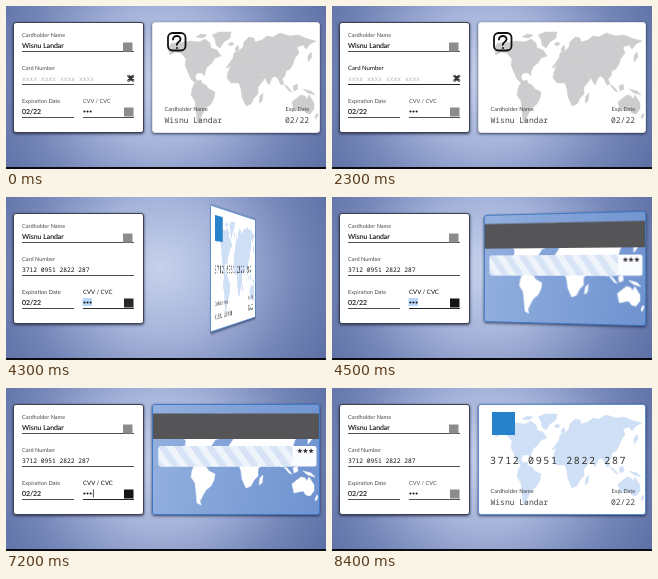
An HTML page that plays this animation: 320x163 px, repeating every 8500 ms.

```html
<!DOCTYPE html>
<html lang="en">
<head>
<meta charset="utf-8">
<title>Card form</title>
<style>
html, body { margin: 0; width: 100%; height: 100%; overflow: hidden; }
body {
  position: relative;
  background: radial-gradient(circle at 155px 71px, #c6d2ec 0, #a5b3da 70px, #7586b8 135px, #576a9f 200px);
}
body::after { content: ""; position: absolute; left: 0; top: 161px; width: 100%; height: 2px; background: #0b0c12; }
svg { position: absolute; left: 0; top: 0; display: block; }
text { font-family: Lato, sans-serif; text-rendering: geometricPrecision; white-space: pre; }
.mono { font-family: "Noto Sans Mono", monospace; }
.label { font-size: 5.6px; }
.value { font-size: 6.9px; fill: #111; stroke: #111; stroke-width: .12px; }
.box { position: absolute; box-sizing: border-box; top: 16px; height: 111px; border-radius: 3px; box-shadow: 0 1px 3px rgba(15, 20, 45, .75); }
.form { left: 7px; width: 131px; background: #fff; border: .6px solid #3c4152; }
.scene { position: absolute; left: 146px; top: 16px; width: 168px; height: 111px; perspective: 600px; }
#card { width: 100%; height: 100%; transform-style: preserve-3d; }
.face { top: 0; left: 0; width: 168px; overflow: hidden; backface-visibility: hidden; }
.face svg { left: -1px; top: -1px; }
#front { background: #fff; border: 1px solid; }
#back { background: linear-gradient(100deg, #93b0df, #6f93d0); border: 1px solid #3f78c4; transform: rotateY(180deg); }
</style>
</head>
<body>
<div class="box form"></div>
<svg id="fields" width="320" height="163"></svg>

<div class="scene"><div id="card">
  <div id="front" class="box face">
    <svg width="168" height="111" viewBox="146 16 168 111">
      <defs>
        <path id="map" stroke-width=".5" stroke-linejoin="round" d="
          M162 42l4-5 8 0 10-2 9 1 6-3 5 4 1 5 6 2 4 6-6 2-3 5-5 4-2 5 0 4-3-3-5 0-2 4 2 4 4-1 1 4 3 2-2 1-7-3-5-5-4-9-2-5 1-6-5-6-6-1-5 3z
          M206 29l7-3 12 0-1 6-6 4-4 6-4-3-1-6z
          M190 31l5-3 6 1-4 3z
          M188 78l5-2 7 3 3 4 6 3-1 6-3 6-5 4-3 5-3 6 1 4-4-2-1-11-1-9-4-6 1-6z
          M226 57l3-3 9-1 3 2 6 0 4 8 4 6 5 0-3 6-5 6 0 7-4 4-3 6-5 2-4-9-1-8-2-6-8 0-4-5 1-6z
          M254 90l3-3-1 8-3 2z
          M227 52l1-5 5-2 4-4 1-5 5-5 5 1 1 4 7-2 5-4 6 1 7-4 10 3 8-1 10 4 8 2-6 3-4 5-3-4-6 2 2 6-4 5-2 6-3 5-4 2-1 5-3 3 2 5-3 1-3-6-3-3-3 2-3 7-3-5-2-5-6-2 2 3-4 5-5 1-4-7-1-4-6-1-2-3-3 2-3-4-3 2-3 1z
          M229 43l3-4 1 5-3 2z
          M222 38l4-2 2 2-3 2z
          M302 50l3-4 1 5-4 5z
          M278 79l3 1 5 6-3-1z
          M287 80l4-2 1 5-4 2z
          M297 83l8 2 4 4-7-2z
          M286 96l5-4 4-3 4 1 2 3 2-4 5 8 0 6-4 5-4-1-3-4-9 2z
          M309 111l2-4 1 2-2 4z"/>
      </defs>
      <use id="frontMap" href="#map"/>
      <g id="unknown" fill="none" stroke="#111" stroke-linecap="round">
        <rect x="162" y="27" width="17.500" height="17.500" rx="4.500" stroke-width="1.800"/>
        <path d="M167 33.500c0-5 8-4.500 7.500 0-.2 2.600-3.700 2.500-3.700 5.200" stroke-width="1.900"/>
        <circle cx="170.800" cy="42" r=".5"/>
      </g>
      <rect id="brand" x="160" y="24" width="23" height="23" fill="#2682cb"/>
      <text id="cardNumber" class="mono" x="158" y="75.500" font-size="10" letter-spacing="1.620" fill="#333">3712 0951 2822 287</text>
      <g fill="#444">
        <text class="label" x="158.500" y="104.500">Cardholder Name</text>
        <text class="label" x="279.500" y="104.500">Exp. Date</text>
        <text class="mono" x="158.500" y="116.500" font-size="8">Wisnu Landar</text>
        <text class="mono" x="279" y="116.500" font-size="8">02/22</text>
      </g>
    </svg>
  </div>
  <div id="back" class="box face">
    <svg width="168" height="111" viewBox="146 16 168 111">
      <defs>
        <pattern id="stripes" width="13" height="13" patternUnits="userSpaceOnUse" patternTransform="rotate(-35)">
          <rect width="13" height="13" fill="#eff4fb"/><rect width="6.500" height="13" fill="#d6e4f6"/>
        </pattern>
      </defs>
      <use href="#map" fill="#fff" stroke="#fff"/>
      <rect x="146" y="25.500" width="168" height="25.500" fill="#555557"/>
      <rect x="152.500" y="58" width="158" height="20.500" rx="2.500" fill="#fafcff"/>
      <rect x="152.500" y="58" width="134" height="20.500" rx="2.500" fill="url(#stripes)"/>
      <text id="cardCvc" class="mono" x="308" y="68" font-size="9.500" font-weight="bold" text-anchor="end" fill="#111">***</text>
    </svg>
  </div>
</div></div>

<script>
const LOOP = 8500, NUMBER = 670, PASTE = 2380, EXP = 3770, CVC = 4135, BLUR = 7850;
const KEYS = [5480, 5780, 5980];
const $ = id => document.getElementById(id);
const clamp = v => Math.max(0, Math.min(1, v));
const ramp = (t, start, length) => clamp((t - start) / length);
const mix = (a, b, k) => `rgb(${a.map((v, i) => Math.round(v + (b[i] - v) * k))})`;

// name, label, x, baseline, right end, focus start, focus end
const fields = [
  ["name", "Cardholder Name", 16, 31, 128, -1, -1],
  ["number", "Card Number", 16, 64, 128, NUMBER, EXP],
  ["exp", "Expiration Date", 16, 97, 68, EXP, CVC],
  ["cvc", "CVV / CVC", 77, 97, 128, CVC, BLUR]
];
$("fields").innerHTML = `
  <rect id="expSel" x="15.500" y="101" width="19.500" height="8" fill="#b3d4f8"/>
  <rect id="cvcSel" x="76.500" y="101" width="9.500" height="8" fill="#b9d8fa"/>` +
  fields.map(([id, label, x, y, end]) => `
    <text id="${id}Label" class="label" x="${x}" y="${y}">${label}</text>
    <path id="${id}Line" d="M${x} ${y + 14.5}H${end}" stroke-width=".9"/>`).join("") + `
  <text class="value" x="16" y="42">Wisnu Landar</text>
  <text id="mask" class="mono" x="16" y="74.500" font-size="6.330" fill="#b5b5b5">xxxx xxxx xxxx xxxx</text>
  <text id="number" class="mono" x="16" y="74.800" font-size="6.250" fill="#111">3712 0951 2822 287</text>
  <text class="value" x="16" y="108">02/22</text>
  <g id="dots">${[0, 1, 2].map(i => `<circle cx="${78.4 + i * 3.1}" cy="105.500" r="1.050" fill="#151515"/>`).join("")}</g>
  <rect x="117" y="36.500" width="9.500" height="9" fill="#8c8c8e"/>
  <rect id="cvcIcon" x="118" y="101.500" width="9.500" height="9"/>
  <g id="cardIcon" stroke="#333" stroke-linecap="round" fill="none">
    <path d="M122.500 70l4.500 4.500m0-4.500l-4.500 4.500" stroke-width="2.500"/>
    <path d="M122.300 69.800h.1m4.700 0h.1m0 4.900h-.1m-4.700 0h-.1" stroke="#fff" stroke-width=".9"/>
  </g>
  <rect id="caret" width=".8" height="8" fill="#222"/>`;

// 500 ms on, 500 ms off, with a short fade
function blink(t, start) {
  const p = (t - start) % 1000;
  return p < 500 ? (t - start < 500 ? 1 : ramp(p, 0, 120)) : 1 - ramp(p, 500, 120);
}

function typed(t) {
  return t < KEYS[0] ? 3 : KEYS.filter(key => t >= key).length;
}

// caret x, y and opacity
function caret(t) {
  if (t >= NUMBER && t < PASTE) return [16, 68, blink(t, NUMBER)];
  if (t >= PASTE && t < EXP) return [84, 68, blink(t, PASTE)];
  if (t >= KEYS[0] && t < BLUR) {
    const n = typed(t);
    return [77.6 + n * 3.1, 101.5, blink(t, KEYS[n - 1])];
  }
  return [0, 0, 0];
}

function show(id, alpha) { $(id).style.opacity = +alpha; }

function draw(t) {
  let cvcFocus = 0;
  for (const [id, , , , , start, end] of fields) {
    const k = start < 0 ? 0 : ramp(t, start, 200) - ramp(t, end, 200);
    $(id + "Label").style.fontSize = 5.6 + k * .45 + "px";
    $(id + "Label").style.fill = mix([75, 75, 75], [10, 10, 10], k);
    $(id + "Line").style.stroke = mix([60, 60, 60], [10, 10, 10], k);
    cvcFocus = k;
  }
  $("cvcIcon").style.fill = mix([140, 140, 142], [20, 20, 20], cvcFocus);

  const pasted = t >= PASTE, n = typed(t);
  show("mask", !pasted);
  show("cardIcon", !pasted);
  show("number", pasted);
  show("expSel", t >= EXP && t < CVC);
  show("cvcSel", t >= CVC && t < KEYS[0]);
  [...$("dots").children].forEach((dot, i) => dot.style.opacity = +(i < n));
  $("cardCvc").textContent = "*".repeat(n);

  const [x, y, alpha] = caret(t);
  $("caret").setAttribute("x", x);
  $("caret").setAttribute("y", y);
  show("caret", alpha);

  const known = ramp(t, PASTE, 400);
  const tint = mix([205, 205, 207], [207, 223, 245], known);
  $("frontMap").style.fill = $("frontMap").style.stroke = tint;
  $("front").style.borderColor = mix([225, 226, 230], [91, 143, 211], known);
  show("unknown", 1 - known);
  show("brand", known);
  show("cardNumber", known);

  const turn = 180 * (ramp(t, CVC, 400) - ramp(t, BLUR, 400));
  $("card").style.transform = `rotateY(${turn}deg)`;
}

const begin = performance.now();
function tick() {
  draw((performance.now() - begin) % LOOP);
  requestAnimationFrame(tick);
}
tick();
</script>
</body>
</html>
```
